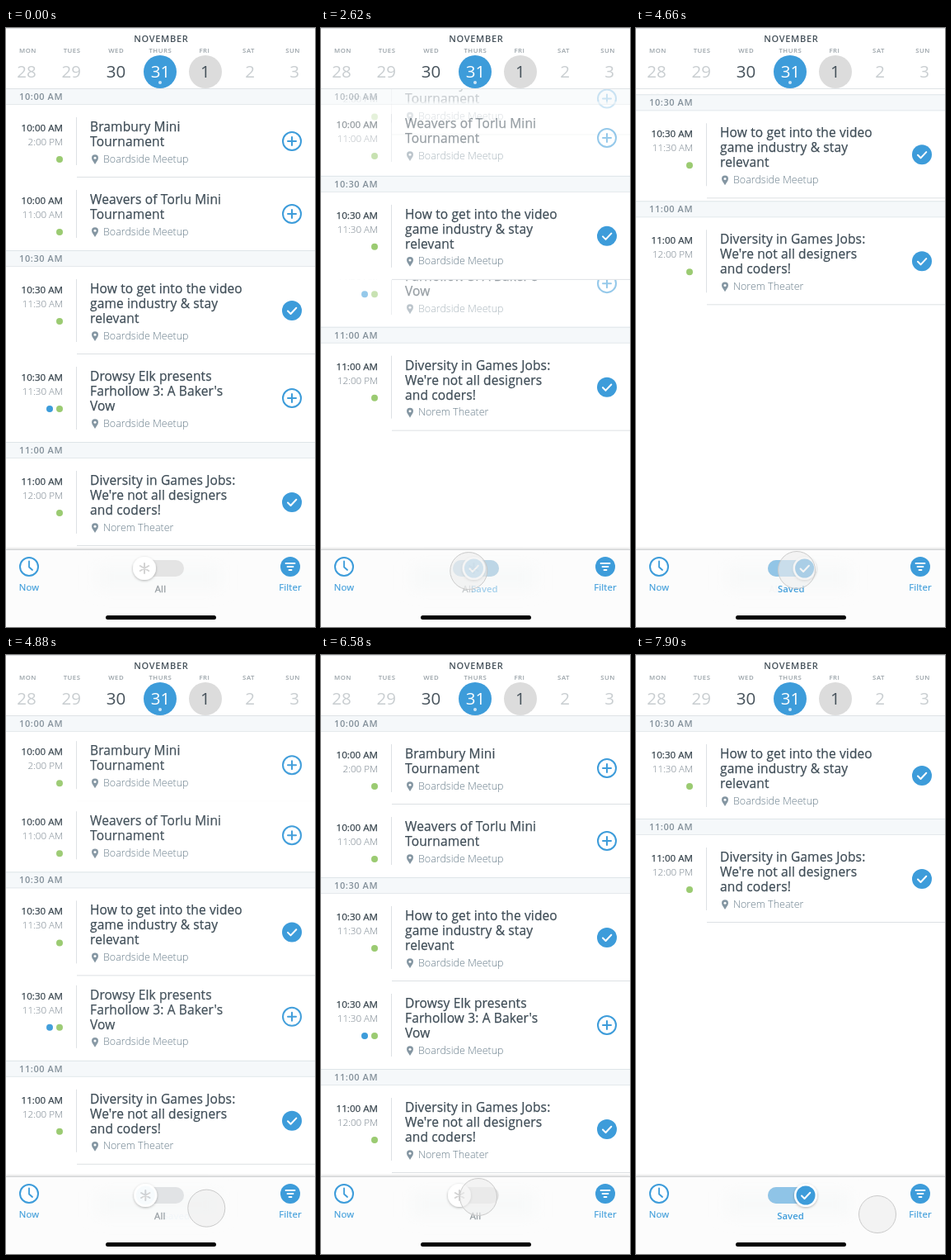
Write an HTML page that moves like this. It is 375 by 725 pixels and loops after 8000 ms.

```html
<!DOCTYPE html>
<html lang="en">
<head>
<meta charset="utf-8">
<title>Schedule with saved filter</title>
<style>
html, body { margin: 0; width: 100%; height: 100%; overflow: hidden; background: #fff; }
svg { display: block; width: 375px; height: 725px; font-family: "Open Sans", "Noto Sans", sans-serif; }
.title { font-size: 15.5px; letter-spacing: .14px; fill: #3f4d57; stroke: #3f4d57; stroke-width: .25px; }
.place { font-size: 12.5px; font-weight: 300; fill: #6a7f8c; }
.start { font-size: 11.6px; fill: #36434c; stroke: #36434c; stroke-width: .25px; text-anchor: end; }
.end { font-size: 11.6px; font-weight: 300; fill: #76828c; text-anchor: end; }
.section { font-size: 11px; font-weight: 600; fill: #83909a; letter-spacing: .6px; }
.mid { text-anchor: middle; }
.month { font-size: 11px; font-weight: 600; fill: #46525b; letter-spacing: .7px; }
.day { font-size: 7.8px; font-weight: 600; fill: #98a1a7; letter-spacing: .5px; }
.tab { font-size: 11.3px; letter-spacing: .2px; fill: #3d9cda; stroke: #3d9cda; stroke-width: .15px; }
#all { fill: #969da2; stroke: #969da2; stroke-width: .3px; }
#saved { font-weight: 600; letter-spacing: 0; stroke: none; }
</style>
</head>
<body>
<svg id="stage" viewBox="0 0 375 725"></svg>
<script>
const LOOP = 8000, BLUE = '#3d9cda', GREEN = '#9bcb72';

// shift: distance travelled when the list is reduced to saved sessions
const rows = [
  { y: 93, h: 88, shift: 112, from: '10:00 AM', to: '2:00 PM', lines: ['Brambury Mini', 'Tournament'] },
  { y: 181, h: 88, shift: 200, last: true, from: '10:00 AM', to: '11:00 AM', lines: ['Weavers of Torlu Mini', 'Tournament'] },
  { y: 395, h: 106, shift: 302, last: true, from: '10:30 AM', to: '11:30 AM', two: true,
    lines: ['Drowsy Elk presents', "Farhollow 3: A Baker's", 'Vow'] },
  { y: 289, h: 106, shift: 196, from: '10:30 AM', to: '11:30 AM', saved: true,
    lines: ['How to get into the video', 'game industry &amp; stay', 'relevant'] },
  { y: 521, h: 106, shift: 303, from: '11:00 AM', to: '12:00 PM', saved: true, place: 'Norem Theater',
    lines: ['Diversity in Games Jobs:', "We're not all designers", 'and coders!'] }
];
const sections = [
  { y: 73, shift: 0, label: '10:00 AM' },
  { y: 269, shift: 196, label: '10:30 AM', saved: true },
  { y: 501, shift: 303, label: '11:00 AM', saved: true }
];

const text = (x, y, cls, str, more = '') => `<text x="${x}" y="${y}" class="${cls}" ${more}>${str}</text>`;
const rect = (x, y, w, h, fill, more = '') =>
  `<rect x="${x}" y="${y}" width="${w}" height="${h}" fill="${fill}" ${more}/>`;
const circle = (x, y, r, fill, more = '') => `<circle cx="${x}" cy="${y}" r="${r}" fill="${fill}" ${more}/>`;
const stroke = (d, color, width) =>
  `<path d="${d}" fill="none" stroke="${color}" stroke-width="${width}" stroke-linecap="round" stroke-linejoin="round"/>`;
const check = (x, y) => stroke(`M${x - 5} ${y + .5}l3.5 3.5 6.8-7.2`, '#fff', 2);

function badge(saved, y) {
  if (saved) return circle(347, y, 12, BLUE) + check(347, y);
  return circle(347, y, 11, '#fff', `stroke="${BLUE}" stroke-width="2"`) +
    stroke(`M342 ${y}h10M347 ${y - 5}v10`, BLUE, 2);
}

function pin(y) {
  return `<path d="M108 ${y + 6}C106.5 ${y + 3} 104 ${y + 1} 104 ${y - 1.8}a4 4 0 0 1 8 0C112 ${y + 1} 109.5 ${y + 3} 108 ${y + 6}z" fill="#8496a2"/>` +
    circle(108, y - 1.8, 1.5, '#fff');
}

function rowMarkup(row, i) {
  const placeY = 33.5 + 18 * row.lines.length;
  return `<g id="row${i}">` +
    rect(0, 0, 375, row.h, '#fff') +
    rect(85, 15, 1, row.h - 30, '#dde1e4') +
    (row.last ? '' : rect(86, row.h - 1, 289, 1, '#dde1e4')) +
    text(69, 32, 'start', row.from) + text(69, 49, 'end', row.to) +
    circle(65, 66, 4, GREEN) + (row.two ? circle(53, 66, 4, BLUE) : '') +
    row.lines.map((s, n) => text(102, 32 + 18 * n, 'title', s)).join('') +
    pin(placeY - 3.5) + text(118, placeY, 'place', row.place || 'Boardside Meetup') +
    badge(row.saved, row.h / 2) + '</g>';
}

const sectionMarkup = (s, i) => `<g id="section${i}">` + rect(0, 0, 375, 20, '#f5f8fa') +
  rect(0, 0, 375, 1, '#dfe5e9') + rect(0, 19, 375, 1, '#e4e9ec') + text(16, 14, 'section', s.label) + '</g>';

function calendar() {
  const days = ['MON', 'TUES', 'WED', 'THURS', 'FRI', 'SAT', 'SUN'];
  const dates = [28, 29, 30, 31, 1, 2, 3];
  const inks = { 30: '#46525b', 31: '#fff', 1: '#46525b' };
  return rect(0, 0, 375, 73, '#fff') + rect(0, 0, 375, 1, '#dcdfe1') + rect(0, 73, 375, 1, '#dfe3e6') +
    text(188.3, 17, 'mid month', 'NOVEMBER') +
    circle(187, 53, 20, BLUE) + circle(242, 53, 20, '#dcdcdc') +
    days.map((d, i) => text(26.5 + 53.6 * i, 30, 'mid day', d)).join('') +
    dates.map((n, i) => text(25 + 54.2 * i, 60, 'mid', n,
      `font-size="20.5" fill="${inks[n] || '#c9ced1'}"`)).join('') +
    circle(187, 66, 2, '#cfe6f6');
}

function toolbar() {
  return rect(0, 631, 375, 94, '#fcfcfc', 'filter="url(#lift)"') +
    rect(0, 631, 375, 1, '#d2d5d7') +
    rect(110, 650, 150, 30, '#f8f9f9', 'filter="url(#soft)"') +
    circle(28, 652, 11, '#fff', `stroke="${BLUE}" stroke-width="2"`) +
    stroke('M28 645.5v7l4 3.5', BLUE, 1.8) + text(28, 681, 'mid tab', 'Now') +
    circle(345, 652, 12, BLUE) + stroke('M339.5 648h11M341.5 652h7M343.5 656h3', '#fff', 1.8) +
    text(345, 681, 'mid tab', 'Filter') +
    rect(160, 644, 56, 20, '#e4e4e4', 'rx="10"') + rect(160, 644, 56, 20, '#8fc4e7', 'rx="10" id="track"') +
    text(0, 683, 'mid tab', 'All', 'id="all"') +
    text(0, 683, 'mid tab', 'Saved', 'id="saved"') +
    '<g id="knob">' + circle(0, 0, 14, '#fff', 'filter="url(#drop)"') +
    '<g id="star">' + stroke('M0-6V6M-5.2-3L5.2 3M-5.2 3L5.2-3', '#d3d3d3', 2) + '</g>' +
    '<g id="tick">' + circle(0, 0, 11.5, BLUE) + check(0, 0) + '</g></g>' +
    rect(121, 711, 134, 5, '#000', 'rx="2.5"');
}

const stage = document.getElementById('stage');
stage.innerHTML = `<defs>
  <filter id="lift" x="-5%" y="-10%" width="110%" height="120%"><feDropShadow dx="0" dy="-1" stdDeviation="1.5" flood-opacity=".16"/></filter>
  <filter id="drop" x="-50%" y="-50%" width="200%" height="200%"><feDropShadow dx="0" dy="1" stdDeviation="1.5" flood-opacity=".3"/></filter>
  <filter id="soft" x="-30%" y="-80%" width="160%" height="260%"><feGaussianBlur stdDeviation="9"/></filter>
  </defs>` + rect(0, 0, 375, 725, '#fff') +
  rows.map(rowMarkup).join('') + sections.map(sectionMarkup).join('') + calendar() + toolbar() +
  circle(0, 0, 22.5, 'rgba(238,238,238,.6)', 'id="touch" stroke="#cacaca" stroke-width="1"');

const el = id => document.getElementById(id);
const move = (id, x, y) => el(id).setAttribute('transform', `translate(${x} ${y})`);
const fade = (id, a) => el(id).setAttribute('opacity', a);
const clamp = v => Math.max(0, Math.min(1, v));
const mix = (a, b, k) => a + (b - a) * k;

// cubic-bezier(.42, 0, .58, 1)
function ease(v) {
  let lo = 0, hi = 1;
  for (let i = 0; i < 20; i++) {
    const s = (lo + hi) / 2, x = 3 * s * (1 - s) * (1 - s) * .42 + 3 * s * s * (1 - s) * .58 + s * s * s;
    if (x < v) lo = s; else hi = s;
  }
  return lo * lo * (3 - 2 * lo);
}
const step = (t, start, length) => ease(clamp((t - start) / length));

// time, x, y
const path = [
  [1550, 326, 702], [2160, 180, 660], [2300, 180, 660], [2340, 179, 657], [2600, 179, 657],
  [3160, 282, 681], [3300, 282, 681], [3340, 283, 681], [3910, 283, 681], [4440, 195, 656],
  [4670, 195, 656], [5140, 312, 689], [5410, 312, 689], [5720, 337.5, 694], [5840, 337.5, 694],
  [6500, 191, 656], [6970, 191, 656], [7420, 293, 677], [8000, 293, 677]
];

function touchAt(t) {
  let i = 0;
  while (i < path.length - 2 && t >= path[i + 1][0]) i++;
  const [a, b] = [path[i], path[i + 1]], k = step(t, a[0], b[0] - a[0]);
  return [mix(a[1], b[1], k), mix(a[2], b[2], k)];
}

function draw(t) {
  const p = step(t, 2478, 300) - step(t, 4620, 300) + step(t, 6768, 300);
  rows.forEach((r, i) => { move('row' + i, 0, r.y - r.shift * p); if (!r.saved) fade('row' + i, 1 - p); });
  sections.forEach((s, i) => { move('section' + i, 0, s.y - s.shift * p); if (!s.saved) fade('section' + i, 1 - p); });
  move('knob', mix(168, 206, p), 654);
  move('all', 187.5 - 20 * p, 0);
  move('saved', 207.5 - 20 * p, 0);
  ['track', 'tick', 'saved'].forEach(id => fade(id, p));
  ['star', 'all'].forEach(id => fade(id, 1 - p));
  move('touch', ...touchAt(t));
  fade('touch', clamp((t - 1550) / 120));
}

function tick(now) {
  draw(now % LOOP);
  requestAnimationFrame(tick);
}
draw(0);
requestAnimationFrame(tick);
</script>
</body>
</html>
```
